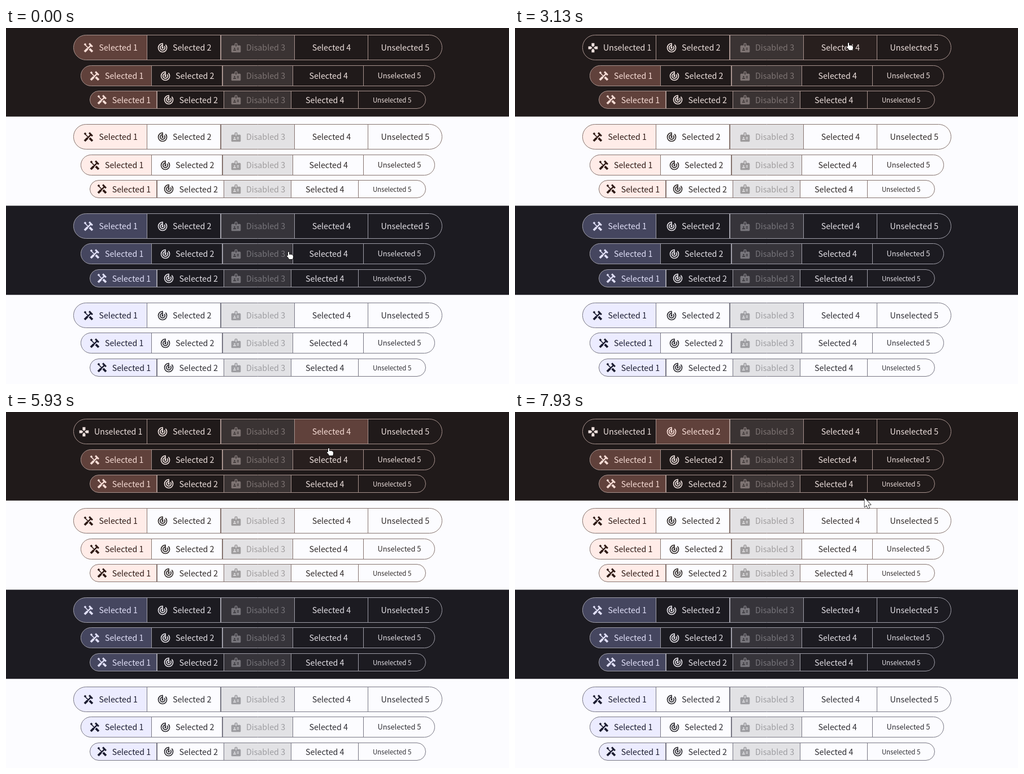
An HTML page with a canvas for the animation above (8 s loop, 890 by 630 pixels).

```html
<!DOCTYPE html>
<html lang="en">
<head>
<meta charset="utf-8">
<title>Segmented buttons</title>
<style>
html, body { margin: 0; width: 100%; height: 100%; overflow: hidden; }
canvas { display: block; }
</style>
</head>
<body>
<canvas id="stage" width="890" height="630"></canvas>
<script>
const ctx = document.getElementById('stage').getContext('2d');
const LOOP = 8000, STEP = 200 / 3, PITCH = 157.75, SIZE = 14.25, ICON = 20;
const FAMILY = '"Noto Sans CJK JP", "Noto Sans CJK SC", "Noto Sans CJK", sans-serif';

const themes = [
  { bg: '#201a1a', line: '#a8938e', text: '#ede0dd', sel: '#60413b', selText: '#f8ddd6' },
  { bg: '#fcfcff', line: '#85736e', text: '#302a29', sel: '#ffece8', selText: '#2f1a15' },
  { bg: '#1c1b21', line: '#a09fa9', text: '#e3e0e6', sel: '#45465f', selText: '#e1e0f9' },
  { bg: '#fcfcff', line: '#777683', text: '#2e2d33', sel: '#ececff', selText: '#1b1c30' }
];

// wide: the divider that covers two pixels; last: text size of the final segment
const rows = [
  { x: 119.5, y: 12.3, w: 652, h: 44, wide: 2, last: SIZE },
  { x: 132.5, y: 65.9, w: 626, h: 36, wide: 2, last: 12.8 },
  { x: 148.5, y: 111.3, w: 594, h: 31, wide: 1, last: 11.4 }
];

// pointer legs: start and end time, end point, optional curve control point
const origin = { x: 501, y: 401 };
const legs = [
  { from: 0, to: 333, x: 190, y: 34, via: [470, 450] },
  { from: 1000, to: 1667, x: 413, y: 511, via: [980, 640] },
  { from: 1667, to: 1867, x: 282, y: 153 },
  { from: 1867, to: 2200, x: 424, y: 6, via: [290, 20] },
  { from: 2400, to: 2667, x: 282, y: 28 },
  { from: 2934, to: 3133, x: 591, y: 31 },
  { from: 3600, to: 4267, x: 590, y: 112, via: [250, 460] },
  { from: 4267, to: 5333, x: 571, y: 74, via: [-300, 560] },
  { from: 5867, to: 5933, x: 572, y: 69 },
  { from: 5933, to: 6267, x: 285, y: 33 },
  { from: 6400, to: 6600, x: 287, y: 36 },
  { from: 6800, to: 7667, x: 540, y: 112, via: [-140, 420] },
  { from: 7667, to: 7933, x: 618, y: 152 }
];

const arrow = new Path2D('M.5 .5V16.3L4.1 12.9 6.6 18.7 9.1 17.6 6.6 12H11.6z');
const hand = new Path2D('M-2-4q1-2 2 0v4q5-1 7 2v2q0 2-1 4h-6q-1-3-4-5 0-2 2-1z');

const ramp = (t, a, b) => Math.min(1, Math.max(0, (t - a) / (b - a)));
const ease = u => u * u * (3 - 2 * u);
const edge = (row, i) => Math.floor(row.x + row.w * i / 5 - 0.5);
const topOf = (row, s) => Math.round(row.y + PITCH * s) + 0.5;

function line(width, x1, y1, x2, y2) {
  ctx.lineWidth = width;
  ctx.beginPath();
  ctx.moveTo(x1, y1);
  ctx.lineTo(x2, y2);
  ctx.stroke();
}

// icons are drawn on a 24-unit grid
const icons = {
  tools() {
    line(4.6, 3.6, 20.4, 9.8, 14.2);
    line(4.6, 20.4, 20.4, 14.2, 14.2);
    line(2.8, 8, 16, 17, 7);
    line(3.6, 13.4, 2.9, 20.4, 9.9);
    line(2, 11, 12, 5, 6);
    line(4, 3.4, 3.4, 6.2, 6.2);
  },
  pad() {
    ctx.translate(12, 12);
    for (let i = 0; i < 4; i++) {
      ctx.fill(new Path2D('M-3-10h6v5.5l-3 3-3-3z'));
      ctx.rotate(Math.PI / 2);
    }
  },
  radar() {
    line(2, 12, 2, 12, 12);
    for (const r of [9, 5]) {
      ctx.beginPath();
      ctx.arc(12, 12, r, -Math.PI / 4, Math.PI * 1.5);
      ctx.stroke();
    }
    ctx.beginPath();
    ctx.arc(12, 12, 2, 0, Math.PI * 2);
    ctx.fill();
  },
  badge() {
    ctx.beginPath();
    ctx.roundRect(2, 7, 20, 15, 2);
    ctx.roundRect(9, 2, 6, 5, [2, 2, 0, 0]);
    ctx.rect(11, 4, 2, 5);
    ctx.roundRect(7.5, 12, 3, 3, 1.5);
    ctx.roundRect(6, 15.75, 6, 2.25, [1.5, 1.5, 0, 0]);
    ctx.rect(14, 12, 4, 1.5);
    ctx.rect(14, 15, 4, 1.5);
    ctx.fill('evenodd');
  }
};

function pointerAt(t) {
  let prev = origin;
  for (const leg of legs) {
    if (t < leg.from) break;
    if (t < leg.to) {
      const u = ease(ramp(t, leg.from, leg.to)), v = 1 - u;
      const [cx, cy] = leg.via || [(prev.x + leg.x) / 2, (prev.y + leg.y) / 2];
      const bend = (a, c, b) => v * v * a + 2 * u * v * c + u * u * b;
      return { x: bend(prev.x, cx, leg.x), y: bend(prev.y, cy, leg.y) };
    }
    prev = leg;
  }
  return prev;
}

function hit({ x, y }) {
  for (let s = 0; s < themes.length; s++) {
    for (const row of rows) {
      const dx = x - row.x, dy = y - topOf(row, s);
      if (dy > 1 && dy < row.h && dx > 0 && dx < row.w) {
        return { s, row, i: Math.floor(dx / row.w * 5) };
      }
    }
  }
  return null;
}

function drawLabel(cx, cy, text, icon, color, size) {
  ctx.font = `400 ${size}px ${FAMILY}`;
  ctx.fillStyle = ctx.strokeStyle = color;
  const lead = icon ? ICON + 8 : 0;
  const x = cx - (ctx.measureText(text).width + lead) / 2;
  ctx.fillText(text, x + lead, Math.round(cy + 5.6) - (SIZE - size) * 0.37);
  if (!icon) return;
  ctx.save();
  ctx.translate(Math.round(x), Math.round(cy) - ICON / 2);
  ctx.scale(ICON / 24, ICON / 24);
  icons[icon]();
  ctx.restore();
}

function drawRow(s, row, t, over) {
  const theme = themes[s], y = topOf(row, s);
  const live = s === 0 && row === rows[0];
  const amount = live
    ? [1 - ramp(t, 200, 400), ramp(t, 6800, 7067), 0, ramp(t, 3600, 3867) - ramp(t, 6000, 6400), 0]
    : [1, 0, 0, 0, 0];
  const swapped = live && t > 1060;
  const labels = [swapped ? 'Unselected 1' : 'Selected 1', 'Selected 2', 'Disabled 3', 'Selected 4', 'Unselected 5'];
  const marks = [swapped ? 'pad' : 'tools', 'radar', 'badge'];

  ctx.beginPath();
  ctx.roundRect(row.x, y, row.w, row.h, row.h / 2);
  ctx.save();
  ctx.clip();
  for (let i = 0; i < 5; i++) {
    const x = edge(row, i), w = edge(row, i + 1) - x + 1;
    const fill = (color, alpha) => {
      ctx.globalAlpha = alpha;
      ctx.fillStyle = color;
      ctx.fillRect(x, y - 1, w, row.h + 2);
    };
    if (i === 2) fill(theme.text, 0.125);
    else if (over && over.s === s && over.row === row && over.i === i) fill(theme.sel, 0.13);
    fill(theme.sel, amount[i]);
  }
  ctx.restore();

  ctx.fillStyle = ctx.strokeStyle = theme.line;
  ctx.lineWidth = 1;
  ctx.stroke();
  for (let i = 1; i < 5; i++) {
    ctx.fillRect(edge(row, i), y, i === row.wide ? 2 : 1, row.h);
  }
  for (let i = 0; i < 5; i++) {
    const cx = row.x + row.w * (i + 0.5) / 5;
    const color = amount[i] > 0.5 ? theme.selText : theme.text;
    // hex alpha 61 is 38 %, used for the disabled segment
    drawLabel(cx, y + row.h / 2, labels[i], marks[i], i === 2 ? color + '61' : color, i === 4 ? row.last : SIZE);
  }
}

function drawPointer({ x, y }, shape) {
  ctx.save();
  ctx.translate(Math.round(x), Math.round(y));
  ctx.lineJoin = 'round';
  ctx.lineWidth = 1.5;
  ctx.strokeStyle = '#111';
  ctx.fillStyle = '#fff';
  ctx.stroke(shape);
  ctx.fill(shape);
  ctx.restore();
}

function draw(now) {
  const t = Math.floor((now % LOOP + 4) / STEP) * STEP + 1;
  const pointer = pointerAt(t), over = hit(pointer);
  themes.forEach((theme, s) => {
    ctx.fillStyle = theme.bg;
    ctx.fillRect(0, PITCH * s - 1, 890, 640);
  });
  themes.forEach((theme, s) => {
    for (const row of rows) drawRow(s, row, t, over);
  });
  drawPointer(pointer, over ? hand : arrow);
}

const start = performance.now();
function tick() {
  draw(performance.now() - start);
  requestAnimationFrame(tick);
}
tick();
</script>
</body>
</html>
```
